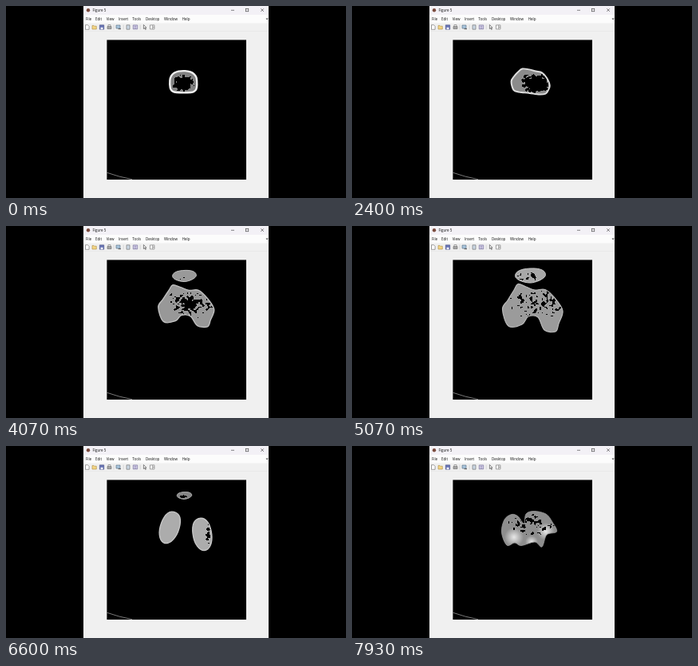
An HTML page with a canvas that plays this animation: 426 px wide and 240 px high, repeating every 8 s.

```html
<!DOCTYPE html>
<html lang="en">
<head>
<meta charset="utf-8">
<title>Figure 5</title>
<style>
  html, body { margin: 0; width: 100%; height: 100%; overflow: hidden; background: #000; }
  svg, canvas { position: absolute; left: 0; top: 0; width: 426px; height: 240px; }
  text { font: 4.5px "Open Sans", "Noto Sans", sans-serif; fill: #111; }
</style>
</head>
<body>
<svg viewBox="0 0 426 240">
  <rect x="97" width="232" height="240" fill="#f0f0f0"/>
  <rect x="97" width="232" height="11" fill="#f3f1f6"/>
  <rect x="97" y="11" width="232" height="10.5" fill="#fcfcfc"/>
  <path d="M97 31.5H329" stroke="#e4e4e4" stroke-width=".6"/>
  <circle cx="103" cy="5.2" r="2.2" fill="#7a4a3c"/>
  <text x="108.5" y="7">Figure 5</text>
  <g id="menu"></g>
  <g fill="none" stroke="#333" stroke-width=".6">
    <path d="M282 5.3h4M319.3 3.3l3.6 3.6m0-3.6l-3.6 3.6"/>
    <rect x="300.4" y="3.4" width="3.4" height="3.4"/>
  </g>
  <path d="M325.6 15.5h3l-1.5 1.8z" fill="#333"/>
  <g fill="#fff" stroke="#666" stroke-width=".6">
    <path d="M99.5 23.7h3l1.6 1.6v4h-4.6z"/>
    <path d="M108 29v-4.6h2l.7.8h2.6V29z" fill="#f3d583" stroke="#a88843"/>
    <path d="M117.3 23.8h5.4v5.4h-5.4z" fill="#6874b5" stroke="#454d85"/>
    <path d="M118.6 26.8h2.8v2.4h-2.8z" stroke="none"/>
    <path d="M127 25.6h5v3h-5z" fill="#aaa"/>
    <path d="M128 23.6h3v2h-3z"/>
    <path d="M138 24h5v4h-5z" fill="#a9c5dc" stroke="#536b80"/>
    <path d="M140.6 28.6h3.4" stroke-width="1.2"/>
    <path d="M151 23.8h4v5.4h-4z" fill="#cbd7e4"/>
    <path d="M159.3 23.9h5.4v5h-5.4z" fill="#d9d4ed" stroke="#665e8e"/>
    <path d="M160.7 25.4h2.6m-2.6 2h2.6" stroke="#665e8e"/>
    <path d="M172.4 23.5v5l1.2-1.1 1 2.1.8-.4-1-2h1.6z" stroke="#333"/>
    <path d="M180.5 23.9h5.4v5h-5.4zm3.2 0v5m0-2.5h2.2"/>
    <path d="M135 23.5v6m12.2-6v6m21-6v6" stroke="#c4c4c4"/>
  </g>
  <rect x="126.4" y="42.4" width="174.6" height="174.6"/>
  <path d="M126.5 208.3Q141 213.5 158 216.7" fill="none" stroke="#aaa" stroke-width=".7"/>
</svg>
<canvas id="scan" width="426" height="240"></canvas>
<script>
const SLICES = 120, SLICES_PER_MS = 0.015;

const menu = { File: 100, Edit: 112, View: 125.7, Insert: 141, Tools: 158.3, Desktop: 175, Window: 198, Help: 220.7 };
document.getElementById('menu').innerHTML =
  Object.entries(menu).map(([label, x]) => `<text x="${x}" y="17.8">${label}</text>`).join('');

const ctx = document.getElementById('scan').getContext('2d');

const mix = (a, b, k) => a + (b - a) * k;
const progress = (v, from, to) => Math.min(1, Math.max(0, (v - from) / (to - from)));
const smooth = k => k * k * (3 - 2 * k);
const signedPow = (v, e) => Math.sign(v) * Math.abs(v) ** e;

// Sixteen points, clockwise from the upper left; a low `bottom` exponent squares off the lower half.
function oval(cx, cy, rx, ry, tilt = 0, bottom = 1) {
  return Array.from({ length: 16 }, (_, i) => {
    const a = (i / 16) * 2 * Math.PI - 2.27, e = Math.sin(a) > 0 ? bottom : 0.85;
    const x = rx * signedPow(Math.cos(a), e), y = ry * signedPow(Math.sin(a), e);
    return [cx + x * Math.cos(tilt) - y * Math.sin(tilt), cy + x * Math.sin(tilt) + y * Math.cos(tilt)];
  });
}

const shaft = oval(222.3, 94.7, 17, 13.6, 0, 0.5);
const femurEnd = [[203, 80], [208, 72.5], [218, 76], [229, 80], [242, 79.5], [254, 90], [264, 106], [259, 122],
  [255, 132], [241, 130], [233, 114], [221, 113], [213, 123], [196, 125], [188.5, 104], [195, 93]];
const plateau = [[191, 92], [200, 85.5], [208, 88], [215.5, 97], [218, 85], [228, 81.5], [243, 85], [251, 95],
  [256.5, 107], [244, 111], [238, 126], [229, 120], [212, 124.5], [204, 121], [194, 124], [187.5, 108]];

// Widens early, drops late; then the notch rises until the bone divides.
function femur(slice) {
  const p = smooth(progress(slice, 10, 76)), rise = progress(slice, 76, 88);
  const outline = shaft.map(([x, y], i) => {
    const [endX, endY] = femurEnd[i];
    return [mix(x, endX, p), mix(y, endY, endY > y ? p * p : p)];
  });
  outline[3][1] += 6 * rise;
  outline[10][1] -= 20 * rise;
  outline[11][1] -= 20 * rise;
  return {
    outline, fill: mix(130, 155, p) + 15 * rise, edge: mix(240, 185, p), width: mix(2.4, 1.2, p),
    cavity: { x: 223 + 8 * progress(slice, 0, 35), y: 97, rx: 15 + 20 * p, ry: 11.5 + 8 * p,
      scatter: 0.4 + 1.5 * p ** 6 + 2 * rise }
  };
}

function kneecap(slice) {
  const size = Math.sin(Math.PI * progress(slice, 46, 106)) ** 0.7;
  const rx = 19 * size, ry = 9 * size, y = 62 + 6 * Math.exp((46 - slice) / 6);
  return {
    outline: oval(223.5, y, rx, ry, -0.05, 1.2), fill: mix(100, 168, size), edge: mix(150, 205, size), width: 1,
    cavity: { x: 223, y: y + 1, rx: 0.9 * rx, ry: 0.6 * ry, scatter: 0.2 + (106 - slice) / 12 }
  };
}

const condyle = (x, y, tilt, cavityOffset, cavityWidth) => slice => {
  const size = Math.sqrt(1 - progress(slice, 88, 110) ** 2);
  return {
    outline: oval(x, y, 13.5 * size, 23.5 * size, tilt), fill: 172, edge: 200, width: 1.3,
    cavity: { x: x + cavityOffset * size, y: y - 4, rx: cavityWidth * size, ry: 20 * size, scatter: 1.1 }
  };
};

function tibia(slice) {
  const size = Math.sqrt(progress(slice, 106, 119));
  const glow = (x, y, r) => ({ x: mix(222, x, size), y: mix(106, y, size), r: r * size });
  return {
    outline: plateau.map(([x, y]) => [mix(222, x, size), mix(106, y, size)]),
    fill: mix(175, 142, size), edge: 155, width: 0.8,
    cavity: { x: 222, y: 98, rx: 33 * size, ry: 18 * size, scatter: 1.9 },
    glows: [glow(203, 114, 12), glow(243, 107, 11), glow(225, 120, 8)]
  };
}

const bones = [
  { from: 0, to: 88, at: femur },
  { from: 46, to: 106, at: kneecap },
  { from: 88, to: 110, at: condyle(205, 102, 0.33, 0, 0) },
  { from: 88, to: 110, at: condyle(246, 110.5, -0.17, 9, 5) },
  { from: 107, to: SLICES, at: tibia }
];

function smoothLoop(points) {
  const path = new Path2D(), n = points.length;
  path.moveTo(...points[0]);
  points.forEach((a, i) => {
    const p = points[(i + n - 1) % n], b = points[(i + 1) % n], q = points[(i + 2) % n];
    path.bezierCurveTo(a[0] + (b[0] - p[0]) / 6, a[1] + (b[1] - p[1]) / 6,
      b[0] - (q[0] - a[0]) / 6, b[1] - (q[1] - a[1]) / 6, ...b);
  });
  path.closePath();
  return path;
}

function hash(x, y, z) {
  const s = Math.sin(x * 12.9898 + y * 78.233 + z * 37.719) * 43758.5453;
  return s - Math.floor(s);
}

// Trilinear value noise, so that marrow specks drift from slice to slice.
function noise(x, y, z) {
  const ix = Math.floor(x), iy = Math.floor(y), iz = Math.floor(z);
  const row = (j, k) => mix(hash(ix, iy + j, iz + k), hash(ix + 1, iy + j, iz + k), x - ix);
  const layer = k => mix(row(0, k), row(1, k), y - iy);
  return mix(layer(0), layer(1), z - iz);
}

function drawCavity({ x: cx, y: cy, rx, ry, scatter }, slice) {
  ctx.fillStyle = '#000';
  for (let y = Math.floor(cy - ry); y < cy + ry; y++) {
    for (let x = Math.floor(cx - rx); x < cx + rx; x++) {
      const depth = 1 - Math.hypot((x + .5 - cx) / rx, (y + .5 - cy) / ry);
      const grain = 1.6 * noise(x / 2.2, y / 2.2, slice / 4) - .3;
      if (depth > 0 && depth > grain * scatter) ctx.fillRect(x, y, 1, 1);
    }
  }
}

function drawGlow({ x, y, r }) {
  const light = ctx.createRadialGradient(x, y, 0, x, y, r);
  light.addColorStop(0, 'rgba(255,255,255,.8)');
  light.addColorStop(1, 'rgba(255,255,255,0)');
  ctx.fillStyle = light;
  ctx.fillRect(x - r, y - r, 2 * r, 2 * r);
}

function drawBone({ outline, fill, edge, width, cavity, glows = [] }, slice) {
  const path = smoothLoop(outline), grey = v => `rgb(${v},${v},${v})`;
  ctx.fillStyle = grey(fill);
  ctx.fill(path);
  ctx.save();
  ctx.clip(path);
  glows.forEach(drawGlow);
  drawCavity(cavity, slice);
  ctx.restore();
  ctx.strokeStyle = grey(edge);
  ctx.lineWidth = width;
  ctx.stroke(path);
}

function render() {
  const slice = Math.floor((performance.now() + 3.4) * SLICES_PER_MS) % SLICES;
  ctx.clearRect(0, 0, 426, 240);
  for (const { from, to, at } of bones) {
    if (slice >= from && slice < to) drawBone(at(slice), slice);
  }
  requestAnimationFrame(render);
}
render();
</script>
</body>
</html>
```
